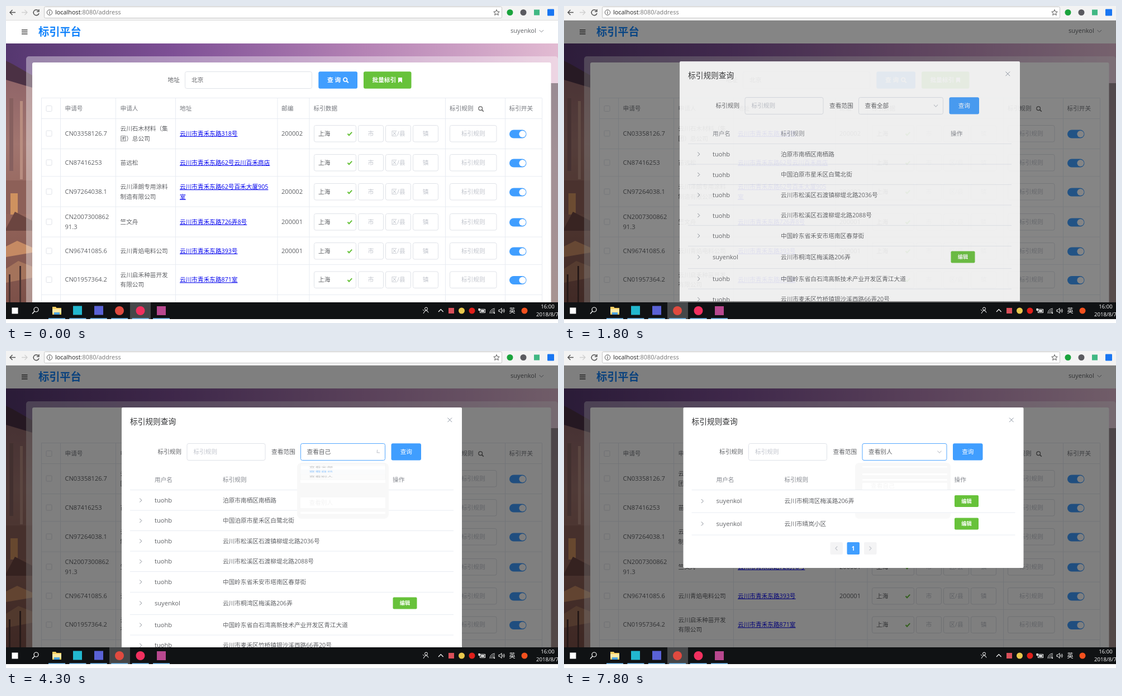
Animation of 988 by 567 pixels, one loop 8000 ms. Source, as an HTML page:

```html
<!DOCTYPE html>
<html lang="zh">
<head>
<meta charset="utf-8">
<style>
html, body { margin: 0; width: 100%; height: 100%; overflow: hidden; background: #fff; }
svg { display: block; width: 988px; height: 567px; }
text { font-family: "Open Sans", "Noto Sans CJK SC", "Noto Sans CJK", sans-serif; white-space: pre; }
</style>
</head>
<body>
<svg id="stage" viewBox="0 0 988 567" xmlns="http://www.w3.org/2000/svg"></svg>
<script>
const BLUE = '#409eff', LIGHT = '#66b1ff', GREEN = '#67c23a';
const INK = '#606266', PALE = '#c0c4cc', EDGE = '#dcdfe6', LINE = '#e6eaf1';
const CJK = 10.67, LATIN = 11.1;

// Drawing helpers; text is placed by its vertical centre
const text = (x, y, s, fill = INK, size = /^[\x00-\x7f]+$/.test(s) ? LATIN : CJK, more = '') =>
  `<text x="${x}" y="${y + size * .36}" font-size="${size}" fill="${fill}" ${more}>${s}</text>`;
const mid = (x, y, s, fill, size = CJK, more = '') => text(x, y, s, fill, size, 'text-anchor="middle" ' + more);
const rect = (x, y, w, h, fill, r = 0, more = '') =>
  `<rect x="${x}" y="${y}" width="${w}" height="${h}" rx="${r}" fill="${fill}" ${more}/>`;
const circle = (x, y, r, fill, more = '') => `<circle cx="${x}" cy="${y}" r="${r}" fill="${fill}" ${more}/>`;
const path = (d, stroke, w = 1, more = '') => `<path d="${d}" fill="none" stroke="${stroke}" stroke-width="${w}" ${more}/>`;
const shape = (d, fill) => `<path d="${d}" fill="${fill}"/>`;
const box = (x, y, w, h, more = '') => rect(x + .5, y + .5, w - 1, h - 1, '#fff', 3, `stroke="${EDGE}" stroke-width=".9" ${more}`);
const hline = (x, y, w, c = LINE) => rect(x, y - .4, w, .9, c);
const group = (id, body, more = '') => `<g id="${id}" ${more}>${body}</g>`;
const lens = (x, y, c, w = 1.4) => circle(x - .8, y - .8, 3.3, 'none', `stroke="${c}" stroke-width="${w}"`) +
  path(`M${x + 1.6} ${y + 1.6}l3.2 3.2`, c, w + .3);

function browser() {
  let s = rect(0, 0, 988, 26, '#f3f3f3') + rect(68.5, 1.5, 819, 20, '#fff', 2, 'stroke="#c6c6c6"') + rect(0, 25, 988, 1, '#dcdcdc');
  s += path('M17 11.5H7M11.5 7L7 11.5l4.5 4.5', '#555', 1.5) + path('M28 11.5h10M33.5 7l4.5 4.5-4.5 4.5', '#d0d0d0', 1.3);
  s += path('M58 8.5a5 5 0 1 0 1 4.5M59 6v4h-4', '#555', 1.5);
  s += circle(78, 11.5, 4.7, 'none', 'stroke="#555"') + rect(77.4, 10.6, 1.2, 3.6, '#555') + rect(77.4, 8.6, 1.2, 1.2, '#555');
  s += text(88, 11.3, 'localhost<tspan fill="#777">:8080/address</tspan>', '#222', 10.9);
  s += path('M878 6.5l1.5 3.5 3.7.3-2.8 2.4.9 3.7-3.3-2-3.3 2 .9-3.7-2.8-2.4 3.7-.3z', '#555');
  return s + circle(902, 11.5, 5.5, '#1aa33c') + circle(926, 11.5, 5.5, '#5b5b60') +
    rect(945, 6.5, 10, 10, '#41b883') + rect(969, 5.5, 12, 12, '#1976f2', 1);
}

// Street at dusk, seen beside and above the panel
function backdrop() {
  return rect(0, 67, 988, 463, 'url(#sky)') + rect(0, 125, 60, 405, 'url(#wall)') +
    shape('M0 98L12 104 47 124V146L0 132z', '#4b3144') +
    rect(6, 165, 7, 130, '#86605f') + rect(25, 170, 5, 140, '#b88d80') +
    rect(0, 312, 47, 60, '#8d6058') + rect(8, 335, 13, 38, '#cf925f') +
    shape('M0 398L16 368 47 384V402H0z', '#6b4540') +
    shape('M0 430l20-10 27 12v9l-47 8z', '#c58a63') + shape('M0 470l22-14 25 10v20l-47 9z', '#a4735b') +
    rect(5, 480, 3, 50, '#4a3230') + rect(24, 465, 3, 65, '#4a3230') +
    rect(974, 138, 14, 392, 'url(#tower)') +
    rect(36, 90, 952, 450, '#fff', 5, 'opacity=".38"') + rect(47, 101, 928.5, 440, '#fff', 3);
}

const ROWS = [
  [228, 'CN03358126.7', '云川石木材料（集|团）总公司', '云川市青禾东路318号', '200002'],
  [280, 'CN87416253', '苗远松', '云川市青禾东路62号云川百禾商店', ''],
  [332, 'CN97264038.1', '云川泽朗专用涂料|制造有限公司', '云川市青禾东路62号百禾大厦905|室', '200002'],
  [386, 'CN2007300862|91.3', '竺文舟', '云川市青禾东路726弄8号', '200001'],
  [438, 'CN96741085.6', '云川青焰电料公司', '云川市青禾东路393号', '200001'],
  [489.5, 'CN01957364.2', '云川启禾种苗开发|有限公司', '云川市青禾东路871室', '']
];

function cell(x, y, s, fill, more) {
  const parts = s.split('|');
  return parts.map((p, i) => text(x, y + (i - (parts.length - 1) / 2) * 17.5, p, fill, undefined, more)).join('');
}
const tick = (x, y) => rect(x - 5, y - 5, 10, 10, '#fff', 1.5, `stroke="${EDGE}" stroke-width=".9"`);

function page() {
  let s = rect(0, 26, 988, 41, '#fff');
  for (let i = 0; i < 3; i++) s += rect(28, 42.2 + i * 3.5, 10.5, 1.4, '#333');
  s += text(58, 46.5, '标引平台', '#1283fb', 19.2, 'font-weight="700"');
  s += text(903, 44.5, 'suyenkol') + path('M954.5 43l3.8 3.8 3.8-3.8', '#8a8d93');
  s += text(289.5, 132.5, '地址') + box(320, 117, 228, 31) + text(332, 132.5, '北京');
  s += rect(559.3, 117.3, 69.7, 30.4, BLUE, 3) + text(575, 132.5, '查 询', '#fff', CJK, 'font-weight="700"') + lens(608, 132.5, '#fff', 1.7);
  s += rect(640, 117.3, 85.5, 30.4, GREEN, 3) + text(655.5, 132.5, '批量标引', '#fff', CJK, 'font-weight="700"') +
    shape('M702 128h7v9.5l-3.5-3-3.5 3z', '#fff');
  for (const y of [164.5, 201.5, 255.5, 304.7, 359, 413, 462.3, 516.5]) s += hline(63, y, 896);
  for (const x of [63, 97, 196, 303, 485.5, 542.5, 786, 893, 959]) s += rect(x, 164.5, .9, 366, LINE);
  s += tick(77, 183.5);
  [[105.5, '申请号'], [204.5, '申请人'], [311, '地址'], [493, '邮编'], [550.5, '标引数据'], [794, '标引规则'], [900.5, '标引开关']]
    .forEach(([x, h]) => s += text(x, 183.5, h, '#74777d', CJK, 'font-weight="500"'));
  s += lens(850, 184, '#666', 1.3);
  for (const [y, id, who, addr, zip] of ROWS) {
    s += tick(77, y) + cell(105.5, y, id) + cell(204.5, y, who) + text(493, y, zip);
    s += cell(311, y, addr, '#0000ee', 'text-decoration="underline"');
    s += box(551, y - 15, 76, 30.5) + text(559, y, '上海') + path(`M611.5 ${y + .5}l2.5 2.7 5.2-5.6`, GREEN, 2);
    [[630, 46, '市'], [679, 46, '区/县'], [728, 46, '镇'], [794, 84.5, '标引规则']]
      .forEach(([x, w, p]) => s += box(x, y - 15, w, 30.5) + mid(x + w / 2, y, p, PALE));
    s += rect(901, y - 6.6, 30.5, 15.2, BLUE, 7.6) + circle(924.5, y + 1, 6.1, '#fff');
  }
  return s;
}

function taskbar() {
  let s = rect(0, 530, 988, 30, '#101214') + rect(0, 560, 988, 7, '#fff') + rect(222, 530, 37, 30, '#454749', 0, 'id="task"');
  s += rect(10.5, 539.5, 11, 11, '#fff') + circle(54, 543, 4, 'none', 'stroke="#fff" stroke-width="1.2"') + path('M51 546l-4 4.5', '#fff', 1.3);
  s += shape('M83 538h6l1.5 2H99v12H83z', '#f6cf63') + rect(83, 542, 16, 7, '#fde9a5') + rect(86, 548, 10, 4, '#4aa3df');
  s += rect(120, 536.5, 16, 16, '#22b8cf') + rect(158, 536.5, 16, 16, '#5a62d6') + circle(203, 545, 8, '#e04a3f');
  s += circle(240.5, 545, 8, '#f0305f') + rect(270, 537, 16, 16, '#b8488f');
  for (let i = 0; i < 6; i++) s += rect(76 + i * 37.4, 558.3, 30, 1.7, '#76b9ed');
  s += circle(752, 541.5, 2.5, 'none', 'stroke="#fff"') + path('M747 550l3-5h4l2 3.5M746 543l2 2', '#fff');
  s += path('M774 547l4.3-4.3 4.3 4.3', '#fff', 1.2);
  s += rect(792, 540, 10, 10, '#d9505a') + circle(815.5, 545, 5.5, '#e9c84d') + circle(834, 545, 5.5, '#e0201b');
  s += rect(848.5, 542.5, 9, 6, 'none', 0, 'stroke="#fff"') + rect(845.5, 541, 3, 4, '#fff') + rect(850, 544, 6, 3, '#fff');
  s += path('M866 550a9 9 0 0 1 9-9M868.5 550a6.5 6.5 0 0 1 6.5-6.5M871 550a4 4 0 0 1 4-4', '#ddd') + circle(874, 549, 1.2, '#fff');
  s += path('M882 543.5h2l3-3v9l-3-3h-2zM889 543q1.5 2 0 4M891 541.5q2.5 3.5 0 7', '#fff');
  s += mid(906, 545, '英', '#fff', 11) + circle(928, 545, 5.5, '#f4511e');
  return s + mid(969.5, 538, '16:00', '#fff', 9.6) + text(949, 552, '2018/8/7', '#fff', 9.6);
}

const RULES = [
  [267, '泊原市南栖区南栖路'], [303.5, '中国泊原市星禾区白鹭北街'],
  [340, '云川市松溪区石渡镇柳堤北路2036号'], [376.5, '云川市松溪区石渡柳堤北路2088号'],
  [413, '中国岭东省禾安市塔南区春芽街'], [451, '云川市桐湾区梅溪路206弄', 1],
  [490, '中国岭东省白石湾高新技术产业开发区青江大道'], [526.5, '云川市麦禾区竹桥镇银沙溪西路66弄20号']
];
const OWN = [[268.5, '云川市桐湾区梅溪路206弄', 1], [309, '云川市晴岚小区', 1]];

const ruleRow = ([y, rule, own]) =>
  path(`M239.3 ${y - 3.5}l3.5 3.5-3.5 3.5`, '#868b94') + text(266, y, own ? 'suyenkol' : 'tuohb') + text(388, y, rule) +
  (own ? rect(692.5, y - 10.5, 43, 21, GREEN, 2) + mid(714, y, '编辑', '#fff', 9.2, 'font-weight="700"') : '');
const table = (rows, lines) => lines.map(y => hline(222, y, 579)).join('') + rows.map(ruleRow).join('');

function pager() {
  return [470, 500, 530.5].map((x, i) => rect(x, 342, 22.5, 22, i == 1 ? BLUE : '#f4f4f5', 2)).join('') +
    path('M482.8 349.5l-3.5 3.5 3.5 3.5M540 349.5l3.5 3.5-3.5 3.5', PALE, 1.1) + mid(511, 353, '1', '#fff', 10, 'font-weight="700"');
}

function dialog() {
  const head = (x, s) => text(x, 230.5, s, '#85888f', CJK, 'font-weight="500"');
  return rect(207, 101, 609, 440, '#fff', 2, 'id="sheet"') + text(222, 126, '标引规则查询', '#303133', 13.7) +
    path('M790.5 119.5l7.6 7.6m0-7.6l-7.6 7.6', '#8c95a3') +
    text(271.5, 180.5, '标引规则') + box(323.5, 165, 141, 31) + text(335.5, 180.5, '标引规则', PALE) +
    text(475, 180.5, '查看范围') + box(527, 165, 152, 31, 'id="select"') + text(538.5, 180.5, '', INK, CJK, 'id="value"') +
    path('M-3.5 -1.8L0 1.8 3.5 -1.8', PALE, 1.1, 'id="arrow"') +
    rect(689.5, 165.2, 53.5, 30.4, BLUE, 3, 'id="query"') + mid(716.3, 180.5, '查询', '#fff', CJK, 'font-weight="500"') +
    head(266, '用户名') + head(388, '标引规则') + head(692, '操作') +
    group('all', table(RULES, [248.5, 285, 321.5, 358, 394.5, 431.5, 471.5, 508])) +
    group('own', table(OWN, [248.5, 289, 329]) + pager());
}

const OPTIONS = ['查看全部', '查看自己', '查看别人'];
const menu = () => rect(527, 205, 152, 87, '#fff', 3, 'stroke="#e4e7ed" stroke-width=".8"') +
  OPTIONS.map((o, i) => rect(527.5, 210 + i * 25.9, 151, 25.9, '#f5f7fa', 0, `id="hover${i}"`) +
    text(542.5, 223 + i * 25.9, o, INK, CJK, `id="opt${i}"`)).join('');

// Pale trace that the menu's shadow leaves on the sheet
const strips = (x, list) => list.map(([y, h]) => rect(x, y, 152, h, '#fff', 1)).join('');
const trace1 = () => rect(521, 200, 164, 100, '#f8f8f8', 8) + strips(527, [[206, 14], [230, 6], [262, 19], [287.5, 4]]) +
  text(542.5, 213, '查看全部', '#f6f6f6') + text(542.5, 271, '查看别人', '#f3f3f3');
const trace2 = () => shape('M521 248V208q0-8 8-8h155q8 0 8 8v40z', '#f8f8f8') + shape('M521 290h171v2q0 8-8 8H529q-8 0-8-8z', '#f9f9f9') +
  strips(534, [[206, 2.5], [219, 3], [229, 3], [236, 12]]) + text(549, 241, '查看自己', '#f5f5f5');

const stage = document.getElementById('stage');
const fade = (id, dir, ...stops) => `<linearGradient id="${id}" ${dir}>` +
  stops.map(([o, c]) => `<stop offset="${o}" stop-color="${c}"/>`).join('') + '</linearGradient>';
const DOWN = 'x2="0" y2="1"';
stage.innerHTML = '<defs>' +
  fade('sky', '', [0, '#55376f'], [.3, '#7d4f95'], [.65, '#b583b5'], [1, '#e2bbd2']) +
  fade('wall', DOWN, [0, '#8f6468'], [.3, '#a1756f'], [.6, '#93645a'], [1, '#7c5048']) +
  fade('tower', DOWN, [0, '#5a4350'], [.35, '#694c55'], [1, '#70504e']) +
  '<clipPath id="view"><rect y="26" width="988" height="504"/></clipPath></defs>' +
  rect(0, 0, 988, 567, '#fff') + backdrop() + page() + browser() +
  rect(0, 26, 988, 504, '#000', 0, 'id="shade"') +
  group('wrap', group('pane',
    group('dialog', dialog()) + group('trace1', trace1() + group('seam', hline(521, 289, 164))) + group('trace2', trace2()) +
    group('menu', menu()), 'clip-path="url(#view)"')) +
  taskbar();

const $ = id => document.getElementById(id);
const set = (id, o) => { for (const k in o) $(id).setAttribute(k, o[k]); };
const show = (id, on) => set(id, { visibility: on ? 'inherit' : 'hidden' });
// Value of the last pair [time, value] already reached
const at = (t, ...keys) => keys.reduce((v, [k, x]) => t >= k ? x : v, keys[0][1]);

function draw(t) {
  const p = at(t, [0, 0], [1700, .22], [1800, .87], [1900, .98], [2000, 1]);
  set('task', { x: t < 1500 ? 222 : 185 });
  set('shade', { opacity: at(t, [0, 0], [1700, .22], [1800, .48], [1900, .5]) });
  set('wrap', { opacity: p, transform: `translate(0 ${-15.2 * (1 - p)})`, visibility: p ? 'visible' : 'hidden' });

  const own = t >= 5000, dx = own ? 6.5 : 0;
  set('dialog', { transform: `translate(${dx} 0)` });
  set('sheet', { height: own ? 287 : 440 });
  show('all', !own);
  show('own', own);

  const sel = at(t, [0, 0], [4100, 1], [7400, 2]);
  $('value').textContent = OPTIONS[at(t, [0, 0], [4300, 1], [7400, 2])];
  set('select', { stroke: at(t, [0, EDGE], [2600, '#cdd1d8'], [2700, PALE], [2900, BLUE], [5000, EDGE], [6200, BLUE]) });
  set('query', { fill: at(t, [0, BLUE], [2200, LIGHT], [2300, BLUE], [4800, LIGHT], [6600, BLUE]) });
  const turn = at(t, [0, 0], [3300, 60], [3400, 140], [3500, 175], [3600, 180], [4300, 50], [4400, 15], [4500, 0],
    [6600, 60], [6700, 140], [6800, 175], [6900, 180], [7400, 50], [7500, 15], [7600, 0]);
  set('arrow', { transform: `translate(665.5 180.5) rotate(${turn})` });

  const open = at(t, [0, 0], [3300, .33], [3400, .8], [3500, .97], [3600, 1], [4300, .33], [4400, .08], [4500, 0],
    [6600, .33], [6700, .8], [6800, .97], [6900, 1], [7400, .33], [7500, .08], [7600, 0]);
  set('menu', { opacity: open < .5 ? open * 1.3 : open, transform: `translate(${dx} ${200 * (1 - open)}) scale(1 ${open || .01})` });
  show('menu', open > 0);
  show('trace1', t >= 3300 && t < 6600);
  show('seam', own && t < 6600);
  show('trace2', t >= 6600);
  const over = at(t, [0, -1], [3800, 1], [6600, -1], [7000, 2]);
  OPTIONS.forEach((_, i) => {
    show('hover' + i, open > 0 && i == over);
    set('opt' + i, { fill: i == sel ? BLUE : INK, 'font-weight': i == sel ? 700 : 400 });
  });
}

const start = performance.now();
function loop() {
  draw((performance.now() - start) % 8000);
  requestAnimationFrame(loop);
}
loop();
</script>
</body>
</html>
```
